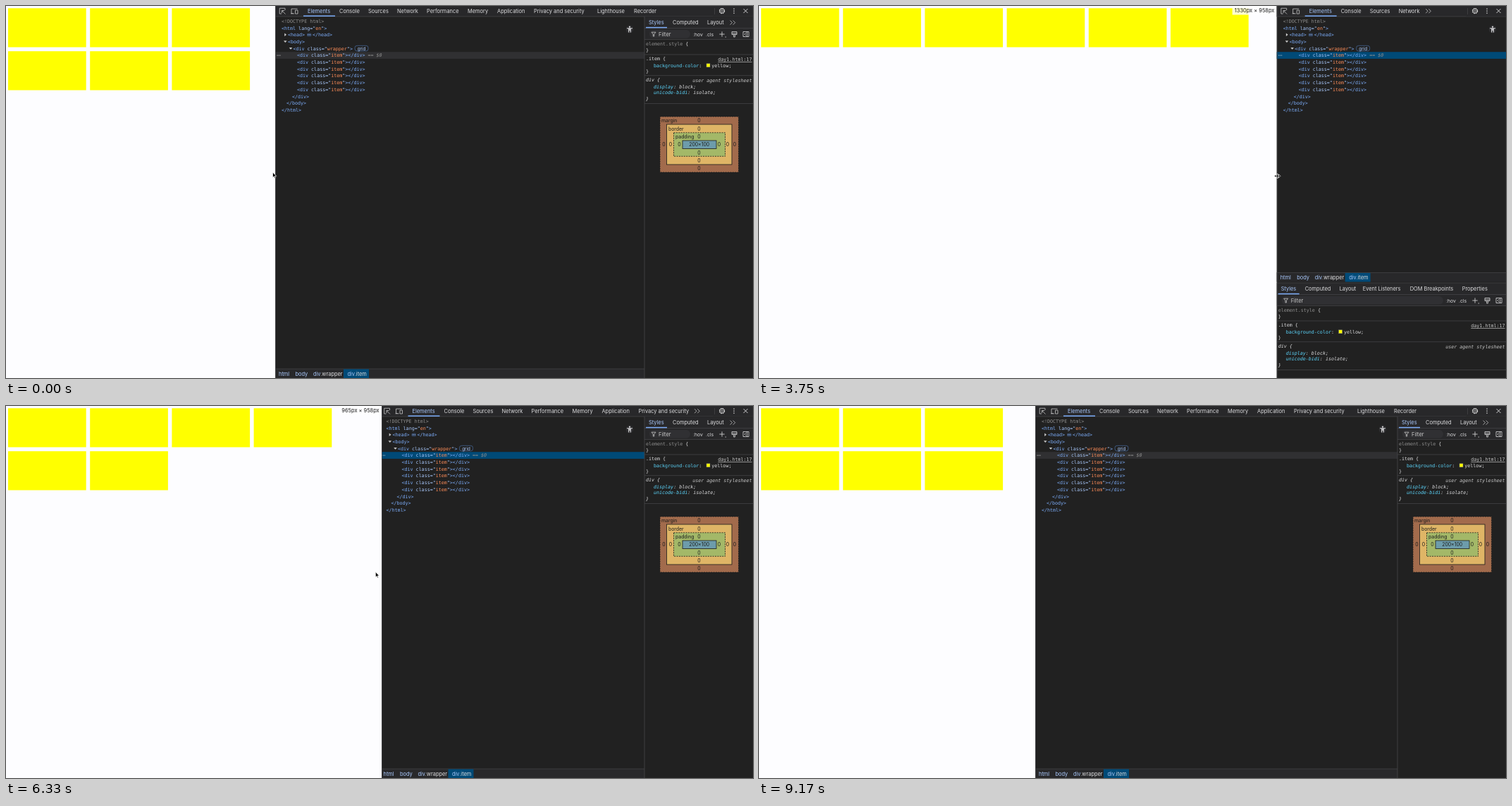
Animation of 1060x528 px, one loop 9.26 s. Source, as an HTML page:

```html
<!DOCTYPE html>
<html lang="en">
<head>
<meta charset="utf-8">
<title>Grid resize in the inspector</title>
<style>
html, body { margin: 0; width: 100%; height: 100%; overflow: hidden; background: #fdfdff; }
svg { display: block; width: 1060px; height: 528px; }
text { white-space: pre; font: 7.45px Inter, Roboto, sans-serif; fill: #dcdcde; }
.mono { font: 6.68px "DejaVu Sans Mono", "Liberation Mono", monospace; }
.it { font-style: italic; }
</style>
</head>
<body>
<script>
const W = 1060, H = 528, LOOP = 9260, TICK = 1000 / 12;
const SIDE = 906, DROP = 378, PX = 1.8105;
const BLUE = '#7cacf8', PALE = '#a8c7fa', ORANGE = '#fe8d59', CYAN = '#5cd5fb';
const GREY = '#8f8f8f', LIGHT = '#dcdcde', LINE = '#47474a', SELECT = '#004a77';

function el(parent, tag, attrs = {}) {
  const e = document.createElementNS('http://www.w3.org/2000/svg', tag);
  for (const k in attrs) e.setAttribute(k, attrs[k]);
  parent.appendChild(e);
  return e;
}
const set = (e, attrs) => { for (const k in attrs) e.setAttribute(k, attrs[k]); };
const group = (p, attrs) => el(p, 'g', attrs);
const move = (e, x, y) => e.setAttribute('transform', `translate(${x} ${y})`);
const show = (e, on) => e.setAttribute('visibility', on ? 'visible' : 'hidden');
const rect = (p, x, y, width, height, fill, more) => el(p, 'rect', { x, y, width, height, fill, ...more });
const path = (p, d, more) => el(p, 'path', { d, fill: 'none', stroke: LIGHT, 'stroke-width': .8, ...more });

// y is the middle of the line; body is a string or [text, colour] parts
function text(p, x, y, body, fill = LIGHT, more = {}) {
  const e = el(p, 'text', { x, y: y + 2.6, style: `fill:${fill}`, ...more });
  if (typeof body === 'string') e.textContent = body;
  else for (const [s, c] of body) el(e, 'tspan', { style: `fill:${c}` }).textContent = s;
  return e;
}
const mono = (p, x, y, body, fill, italic) =>
  text(p, x, y - .2, body, fill, { class: italic ? 'mono it' : 'mono' });

function markup(src) {
  return src.split(/( \w+=|"[^"]*")/).filter(Boolean).map(s => {
    if (s[0] === '"') return [s.slice(1, -1), ORANGE, true];
    return [s, s[0] === ' ' ? PALE : BLUE];
  }).flatMap(([s, c, quoted]) => quoted ? [['"', PALE], [s, c], ['"', PALE]] : [[s, c]]);
}

const svg = el(document.body, 'svg', { viewBox: `0 0 ${W} ${H}` });

// page
rect(svg, 0, 0, W, H, '#fdfdff');
const items = Array.from({ length: 6 }, () => rect(svg, 0, 0, 110.7, 55.3, '#ffff00'));
const sizeBox = group(svg);
const sizeBack = rect(sizeBox, 0, 0, 62, 12.5, '#fff', { 'fill-opacity': .8 });
const sizeText = text(sizeBox, 0, 6.2, '', '#1c1c1c', { 'text-anchor': 'end' });

// inspector
const clip = rect(el(el(svg, 'defs'), 'clipPath', { id: 'panel' }), 0, 0, W, H);
const panel = group(svg, { 'clip-path': 'url(#panel)' });
rect(panel, 0, 0, W, H, '#212121');
rect(panel, 0, 0, W, 15, '#28282a');
rect(panel, 0, 14.6, W, .7, LINE);
const row = rect(panel, 0, 65.2, W, 9.7, '#303032');

const main = group(panel);
path(main, 'M9 11H6.2V3.2H14V6M9.5 6.5L14.5 11.5M9.5 10V6.5H13', { stroke: '#c7c7c7' });
path(main, 'M25 10.5H23V4H31.5M22 10.8H27M28.5 6H32V11H28.5Z', { stroke: '#c7c7c7' });

function tabStrip(parent, y, defs) {
  const tabs = defs.map(([name, x, end], i) => ({ e: text(parent, x, y, name, i ? LIGHT : PALE), end }));
  const more = path(parent, `M-3.5 ${y - 3}l3 3-3 3M.7 ${y - 3}l3 3-3 3`, { stroke: '#c7c7c7' });
  return (left, limit) => {
    const last = tabs.length - 1;
    let edge = 0, all = true;
    tabs.forEach((t, i) => {
      all = all && left + t.end + (i < last ? 24 : 0) < limit;
      show(t.e, all);
      if (all) edge = t.end;
    });
    show(more, !all);
    move(more, edge + 12, 0);
  };
}
const fitMain = tabStrip(main, 7.2, [
  ['Elements', 46, 79], ['Console', 91, 120], ['Sources', 132, 161], ['Network', 173, 203],
  ['Performance', 215, 261], ['Memory', 273, 302], ['Application', 315, 354],
  ['Privacy and security', 367, 438], ['Lighthouse', 457, 496], ['Recorder', 509, 541]
]);
rect(main, 40, 13.4, 45, 1.5, BLUE);

const lineY = i => 21.4 + 9.7 * i;
[
  [9, '<!DOCTYPE html>', GREY], [9, '<html lang="en">'], [18, '<head>'], [18, '<body>'],
  [25.5, '<div class="wrapper">'],
  ...Array(6).fill([31, '<div class="item"></div>']),
  [24, '</div>'], [16, '</body>'], [9, '</html>']
].forEach(([x, s, c], i) => mono(main, x, lineY(i), c ? s : markup(s), c));
mono(main, 53, lineY(2), '</head>', BLUE);
rect(main, 45, 38.4, 6.5, 4.8, '#33445f', { rx: 1.5 });
for (let i = 0; i < 3; i++) {
  el(main, 'circle', { cx: 46.5 + i * 1.7, cy: 40.8, r: .5, fill: PALE });
  el(main, 'circle', { cx: 3 + i * 2, cy: 70, r: .6, fill: LIGHT });
}
const fold = d => path(main, d, { fill: '#c7c7c7', stroke: 'none' });
fold('M13.2 38.5v4.6l2.8-2.3z');
fold('M12 49.2h4.6l-2.3 2.8z');
fold('M19.7 58.9h4.6l-2.3 2.8z');
rect(main, 113, 56.3, 19, 7.6, 'none', { rx: 3, stroke: '#5079b5', 'stroke-width': .6 });
text(main, 122.5, 59.9, 'grid', PALE, { 'text-anchor': 'middle', style: `fill:${PALE};font-size:6.3px` });
mono(main, 131.5, 70, '== $0', GREY, true);

const person = group(panel);
el(person, 'circle', { r: 5.5, fill: '#2c2c2e' });
el(person, 'circle', { cy: -3.3, r: 1.1, fill: LIGHT });
path(person, 'M-4-1.3H4M-1.3-1V4.5M1.3-1V4.5M0-1V2', { stroke: LIGHT, 'stroke-width': 1.1 });

// breadcrumbs
const crumbs = group(panel);
const crumbBack = rect(crumbs, 0, 515, W, 13, '#28282a');
const crumbLine = rect(crumbs, 0, 514.7, W, .7, LINE);
const crumbText = group(crumbs);
rect(crumbText, 97, 515.4, 36, 12.6, SELECT);
[[5, 'html'], [28.5, 'body'], [54, 'div', '.wrapper'], [102.5, 'div', '.item']].forEach(([x, tag, cls = '']) =>
  text(crumbText, x, 522, [[tag, PALE], [cls, LIGHT]]));

// styles pane: left-aligned and right-aligned halves
const pane = group(panel), paneLeft = group(pane), paneRight = group(pane);
rect(paneLeft, 0, 15, W, 600, '#212121');
rect(paneLeft, 0, 15.3, W, 32, '#28282a');
rect(paneLeft, 0, 31.2, W, .7, LINE);
rect(paneLeft, 0, 47, W, .7, LINE);
const edge = rect(paneLeft, -.4, 15, .8, H, LINE);
const topLine = rect(paneLeft, 0, 14.7, W, .7, LINE);
for (const y of [68.6, 98.4, 138]) rect(paneLeft, 0, y, W, .7, LINE);
const fitPane = tabStrip(paneLeft, 23.6, [
  ['Styles', 6, 28], ['Computed', 40, 77], ['Layout', 89, 113],
  ['Event Listeners', 122, 176], ['DOM Breakpoints', 189, 250], ['Properties', 263, 302]
]);
rect(paneLeft, 2, 29.8, 30, 1.5, BLUE);
const filter = rect(paneLeft, 7, 34, 58, 11.6, '#303033', { rx: 5.8 });
path(paneLeft, 'M10 37.2h6l-2.3 2.8v3h-1.4v-3z', { stroke: '#c7c7c7' });
text(paneLeft, 20, 40, 'Filter', '#c7c7c7');

mono(paneLeft, 2, 53.2, [['element.style', GREY], [' {', LIGHT]]);
mono(paneLeft, 2, 62.3, '}');
mono(paneLeft, 2, 74.8, '.item {');
mono(paneLeft, 13, 84.3, [['background-color', CYAN], [':', LIGHT]]);
rect(paneLeft, 88, 81.8, 5, 5, '#ffff00', { stroke: '#777', 'stroke-width': .5 });
mono(paneLeft, 95.3, 84.3, 'yellow;');
mono(paneLeft, 2, 92.8, '}');
mono(paneLeft, 2, 105, 'div {', LIGHT, true);
mono(paneLeft, 13, 114.4, [['display', CYAN], [': block;', LIGHT]], LIGHT, true);
mono(paneLeft, 13, 123, [['unicode-bidi', CYAN], [': isolate;', LIGHT]], LIGHT, true);
mono(paneLeft, 2, 131.8, '}', LIGHT, true);

const endText = (y, s, cls) => text(paneRight, 1058.5, y - .2, s, '#c7c7c7', { class: cls, 'text-anchor': 'end' });
endText(75.6, 'day1.html:17', 'mono').setAttribute('text-decoration', 'underline');
endText(106, 'user agent stylesheet', 'mono it');
for (const [x, s] of [[975, ':hov'], [993, '.cls']])
  text(paneRight, x, 40, s, LIGHT, { style: `fill:${LIGHT};font-size:6.8px` });
path(paneRight, 'M1012.3 40h7.4M1016 36.3v7.4M1020.5 44h1.5');
path(paneRight, 'M1030 36.5h7v4h-7zM1030 38.8h7M1032.6 40.5v3.5h1.8v-3.5');
path(paneRight, 'M1046 36.5h8v7h-8zM1051.5 36.5v7M1050 38l-2 2 2 2');

// box model
const box = group(paneRight);
const layer = (x, y, w, h, fill, dash) => rect(box, x, y, w, h, fill,
  { stroke: '#1c1c1c', 'stroke-width': .8, 'stroke-dasharray': dash ? '2 1.4' : 'none' });
layer(928, 157, 111.5, 79, '#a26b4c', true);
layer(937.5, 168, 92.5, 57, '#dfb566');
layer(947.5, 179.8, 73, 33.5, '#a3b868', true);
layer(960, 191, 48, 11.4, '#6d9cab');
const boxText = (x, y, s, anchor = 'middle') =>
  text(box, x, y, s, '#1c1c1c', { 'text-anchor': anchor, style: 'fill:#1c1c1c;font-size:6.9px' });
[['margin', 930, 162.6], ['border', 940, 174], ['padding', 950, 185.4]].forEach(([s, x, y]) => {
  boxText(x, y, s, 'start');
  boxText(983.5, y, '0');
  boxText(983.5, 393.4 - y, '0');
});
for (const x of [933.5, 943, 955.5, 1012, 1024, 1034]) boxText(x, 196.8, '0');
boxText(983.7, 196.8, '200×100');

// fixed toolbar buttons
rect(panel, 1003, 0, 57, 14.5, '#28282a');
rect(panel, 1005, 3, .7, 9, LINE);
el(panel, 'circle', { cx: 1016, cy: 7, r: 3.5, fill: 'none', stroke: '#c7c7c7', 'stroke-width': 1.4, 'stroke-dasharray': '1.9 .85' });
el(panel, 'circle', { cx: 1016, cy: 7, r: 2.8, fill: 'none', stroke: '#c7c7c7', 'stroke-width': .8 });
el(panel, 'circle', { cx: 1016, cy: 7, r: 1, fill: '#c7c7c7' });
for (const y of [4, 7, 10]) el(panel, 'circle', { cx: 1033, cy: y, r: .85, fill: '#c7c7c7' });
path(panel, 'M1046.5 4l6 6M1052.5 4l-6 6', { stroke: LIGHT, 'stroke-width': .9 });
const border = rect(panel, 0, 0, .8, H, LINE);

// pointers
const ink = { fill: '#000', stroke: '#fff', 'stroke-width': .7, 'stroke-linejoin': 'round' };
const arrow = path(svg, 'M0 0V7.4L1.7 5.9 2.8 8.4 4 7.9 2.9 5.4H5.2Z', ink);
const resize = path(svg, 'M-4.3 0L-2-2.3V-.6H-.9V-3H.9V-.6H2V-2.3L4.3 0 2 2.3V.6H.9V3H-.9V.6H-2V2.3Z', ink);

// moves: start tick, end tick, panel edge, content shift, pointer x from edge, pointer y
const START = [382, 0, -3.5, 236];
const MOVES = [
  [0, 3, 382, 0, -1, 238], [9, 11, 382, 0, .5, 235.5],
  [20, 27, 556, 0, 1, 237], [28, 30, 581, 0, 1, 238], [31, 33, 580, 0, 1, 238],
  [39, 48, 812, 0, 1, 243], [51, 52, 794, -2, -3, 245], [53, 54, 757, -3, -7, 247],
  [55, 56, 735, -3, -9, 248], [56, 59, 640, -3, -9, 246], [60, 62, 623, -2, -8, 243],
  [63, 67, 582, -1.5, -7.5, 238], [67, 69, 560, -2, -8, 237], [70, 73, 549, -2, -8, 236],
  [74, 83, 476.7, -4, -10.7, 234], [83, 86, 458, -3, -8, 232],
  [86, 95, 392, 0, 1.5, 228], [98, 105, 392, 0, -404, 205]
];

function pose(tick) {
  let now = START;
  for (const [from, to, ...goal] of MOVES) {
    if (tick <= from) break;
    const k = Math.min(1, (tick - from) / (to - from));
    now = now.map((v, i) => v + (goal[i] - v) * k);
  }
  return now;
}

function draw(ms) {
  const tick = Math.floor((ms + 5) / TICK);
  const [x, shift, dx, py] = pose(tick);
  const left = x + shift, width = Math.round(x * PX);
  const cols = Math.floor((width - 5) / 210.4);
  const stacked = x > 685;

  items.forEach((e, i) => set(e, { x: 3 + i % cols * 116.2, y: 3.2 + Math.floor(i / cols) * 61 }));

  const sized = tick >= 21 && tick < 102;
  show(sizeBox, sized);
  sizeText.textContent = `${width}px × 958px`;
  sizeText.setAttribute('x', x - 3.3);
  const w = sizeText.getComputedTextLength() + 6.5;
  set(sizeBack, { x: x - w, width: w });

  set(clip, { x, width: W - x });
  border.setAttribute('x', x);
  move(main, left, 0);
  fitMain(left, 1004);
  row.setAttribute('fill', tick >= 18 && tick < 110 ? SELECT : '#303032');
  move(person, stacked ? 1041 : 885, 33);

  move(crumbs, 0, stacked ? -136.5 : 0);
  move(crumbText, left, 0);

  const paneX = stacked ? left : SIDE;
  move(pane, 0, stacked ? DROP : 0);
  move(paneLeft, paneX, 0);
  fitPane(paneX, W);
  filter.setAttribute('width', Math.max(20, 964 - paneX));
  show(edge, !stacked);
  show(topLine, stacked);
  const domWidth = stacked ? W : SIDE;
  for (const e of [row, crumbBack, crumbLine]) e.setAttribute('width', domWidth);

  const sizing = tick >= 11 && tick < 52;
  show(arrow, !sizing);
  show(resize, sizing);
  move(sizing ? resize : arrow, x + dx, py);
}

function frame(now) {
  draw(now % LOOP);
  requestAnimationFrame(frame);
}
draw(0);
requestAnimationFrame(frame);
</script>
</body>
</html>
```
